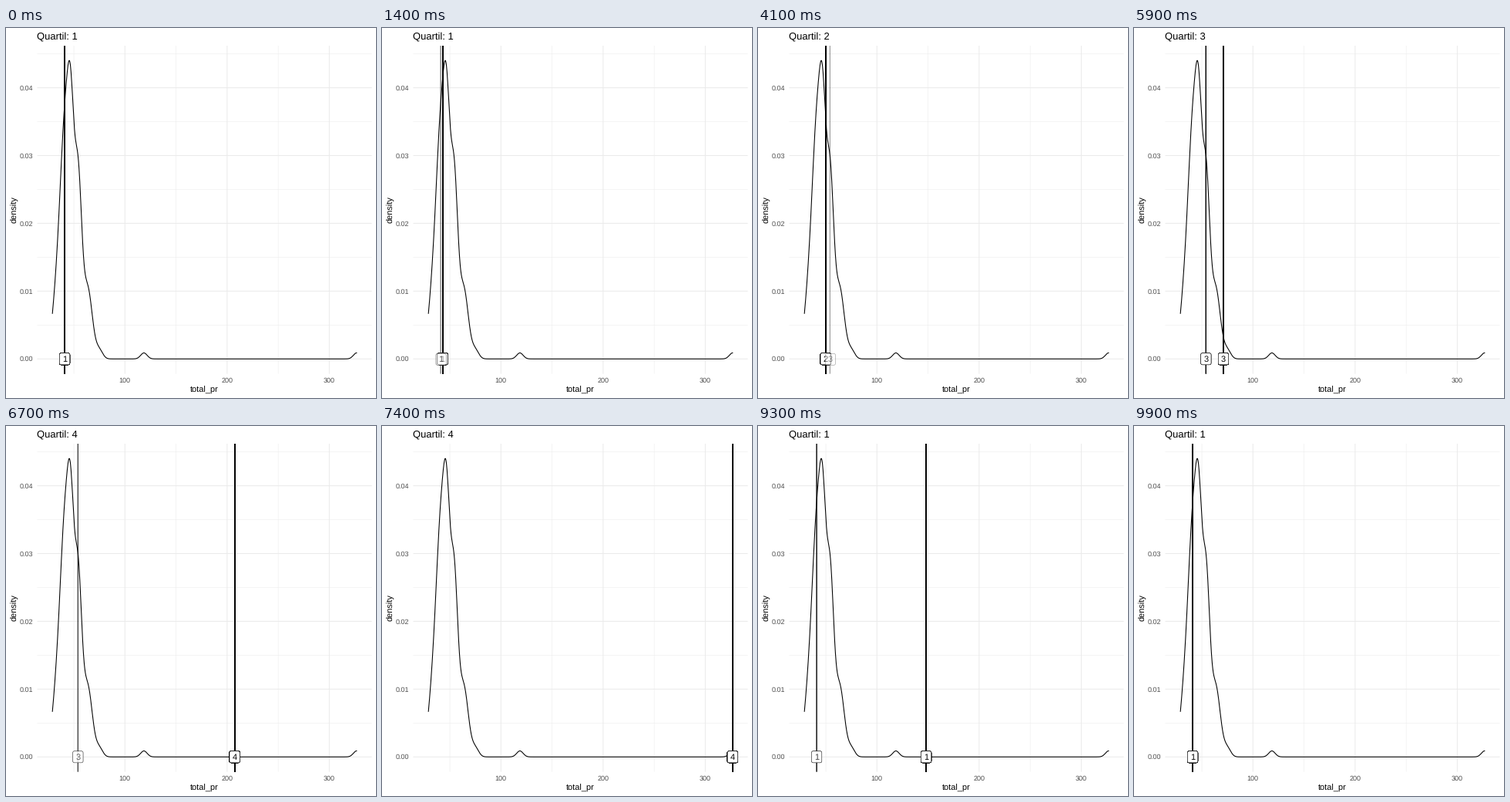
Write a matplotlib script that moves like this. It is 480x480 px and loops after 10000 ms.

```python
import matplotlib.pyplot as plt
import numpy as np
from matplotlib.animation import FuncAnimation
from matplotlib.collections import LineCollection, PathCollection
from matplotlib.patches import BoxStyle

plt.rcParams.update({"font.family": "Liberation Sans", "text.hinting": "none"})

SIZE, DPI = 480, 72
LEFT, RIGHT, TOP, BOTTOM = 40.5, 474.5, 23.0, 448.6
X_MIN, X_MAX = 29, 326.7
X0, X1 = 60.2, 454.8
Y0, Y_SCALE = 429.3, 8795
THIN, HALF = 1.07, 0.53
ROWS = 30  # coinciding rows drawn on top of each other

QUARTILES = {1: 41, 2: 46.5, 3: 54, 4: X_MAX}
# last resting step, first step of next state, from, to, leaving rows, entering rows
MOVES = [
    (8, 25, 1, 2, 1, 0),
    (34, 50, 2, 3, 0, 1),
    (58, 74, 3, 4, 3, 0),
    (83, 99, 4, 1, 0, 3),
]

# density as a sum of bells: centre, height and spread in pixels
BELLS = [
    (66.5, 85, 6.5), (76.8, 270, 6), (84.3, 214, 4.3), (93.5, 225, 4.7),
    (106, 90, 6), (121, 11, 4.5), (178.9, 7.8, 4.2), (X1, 7.8, 4.2),
]


def px(v):
    return X0 + (v - X_MIN) / (X_MAX - X_MIN) * (X1 - X0)


def py(d):
    return Y0 - d * Y_SCALE


def density_curve():
    x = np.linspace(X0, X1, 1600)
    return x, Y0 - sum(h * np.exp(-((x - c) / s) ** 2 / 2) for c, h, s in BELLS)


fig = plt.figure(figsize=(SIZE / DPI, SIZE / DPI), dpi=DPI, facecolor="white")
ax = fig.add_axes([0, 0, 1, 1])
ax.set(xlim=(0, SIZE), ylim=(SIZE, 0))
ax.axis("off")


def lines(segments, width, color="black", z=1):
    coll = LineCollection(segments, linewidths=width, colors=color, zorder=z)
    coll.set_snap(False)
    return ax.add_collection(coll, autolim=False)


def text(x, y, s, size, color="black", ha="center", **kw):
    return ax.text(x, y, s, fontsize=size, color=color, ha=ha, va="baseline", **kw)


def upright(x):
    return [(x, TOP), (x, BOTTOM)]


def level(y):
    return [(LEFT, y), (RIGHT, y)]


x_ticks = (100, 200, 300)
y_ticks = np.arange(5) / 100
lines([upright(px(v - 50)) for v in x_ticks]
      + [level(py(d + 0.005)) for d in y_ticks], HALF, "#ebebeb")
lines([upright(px(v)) for v in x_ticks]
      + [level(py(d)) for d in y_ticks], THIN, "#ebebeb", 2)
ax.plot(*density_curve(), color="black", lw=THIN, zorder=3, snap=False)

for v in x_ticks:
    text(px(v), 460, str(v), 9, "#4d4d4d")
for d in y_ticks:
    text(35.6, py(d) + 3.1, f"{d:.2f}", 9, "#4d4d4d", ha="right")
text((LEFT + RIGHT) / 2, 472.5, "total_pr", 11)
text(14.2, (TOP + BOTTOM) / 2, "density", 11, rotation=90, rotation_mode="anchor")
title = text(LEFT, 15, "", 13, ha="left")


class Marker:
    """Stack of vertical lines with a rounded label at the baseline."""

    box = BoxStyle("round", pad=0, rounding_size=2.16)

    def __init__(self, z):
        self.rule = lines([], THIN, z=4 + z / 10)
        self.tag = PathCollection([], linewidths=HALF, zorder=5 + z)
        self.tag.set_snap(False)
        ax.add_collection(self.tag, autolim=False)
        self.digit = text(0, Y0 + 3.9, "", 11, zorder=5.5 + z)

    def show(self, x, label, rows, alpha=1.0):
        self.rule.set_segments([upright(x)] * rows)
        self.rule.set_color((0, 0, 0, alpha))
        self.tag.set_paths([self.box(x - 6.66, Y0 - 7.5, 13.32, 15, 1)] * rows)
        self.tag.set_facecolor((1, 1, 1, alpha))
        self.tag.set_edgecolor((0, 0, 0, alpha))
        ink = 0
        for _ in range(rows):
            ink = ink * (1 - alpha) ** 2 + alpha
        self.digit.set(x=x, text=str(label), alpha=min(ink, 1))
        self.digit.set_visible(rows > 0)


mover, fader = Marker(0), Marker(1)


def update(i):
    state, x = 1, px(QUARTILES[1])
    fader.show(x, state, 0)
    for start, end, a, b, leaving, entering in MOVES:
        if i >= end:
            state, x = b, px(QUARTILES[b])
        elif i > start:
            p = (i - start) / (end - start)
            xa, xb = px(QUARTILES[a]), px(QUARTILES[b])
            state, x = (a if p < 0.5 else b), xa + (xb - xa) * p
            if leaving:
                fader.show(xa, a, leaving, 1 - p)
            else:
                fader.show(xb, b, entering, p)
    mover.show(x, state, ROWS)
    title.set_text(f"Quartil: {state}")
    return []


anim = FuncAnimation(fig, update, frames=100, interval=100, repeat=True,
                     repeat_delay=0, blit=False)
plt.show()
```
